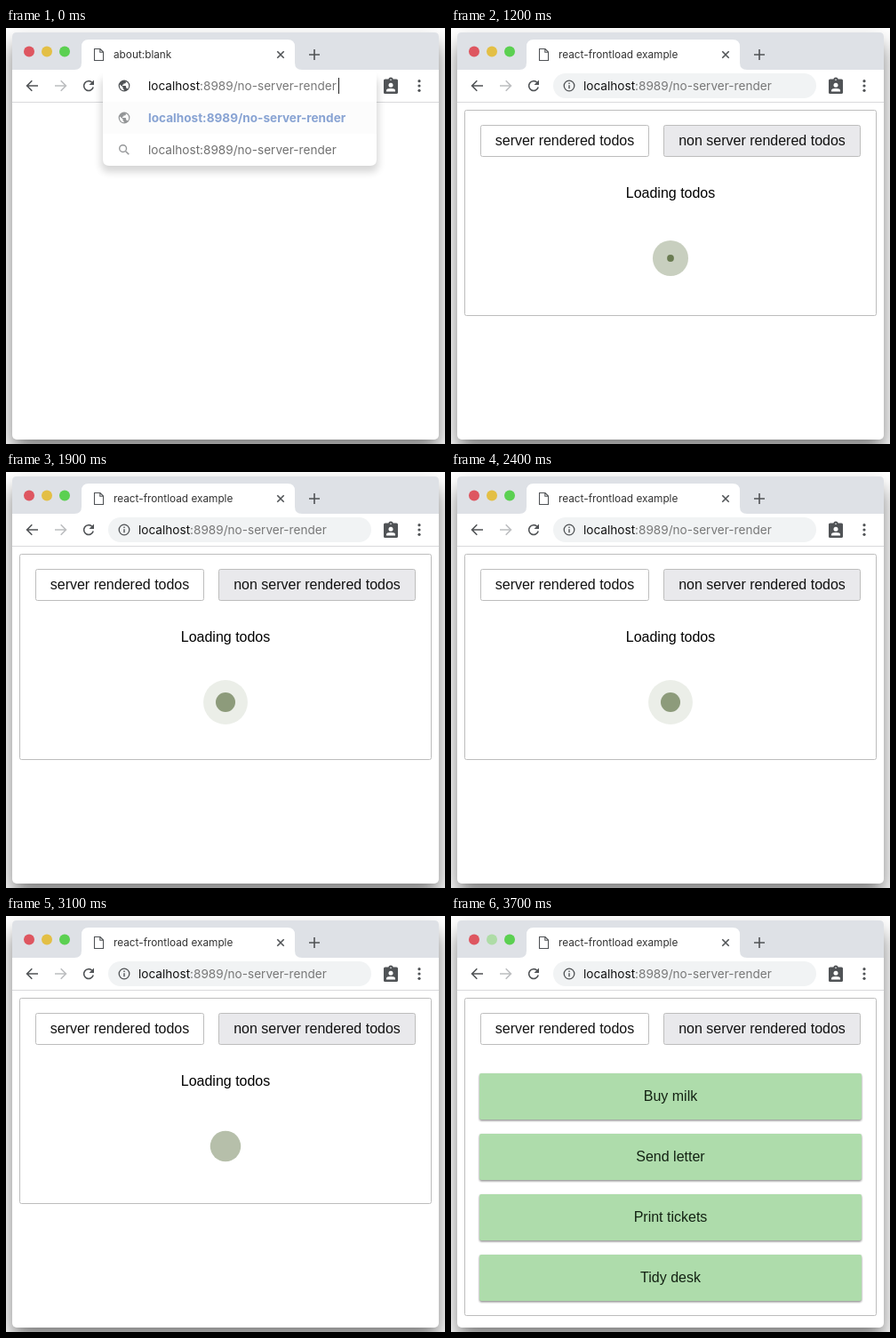
Write an HTML page that moves like this. It is 494 px wide and 468 px high and loops after 5 s.

```html
<!DOCTYPE html>
<html lang="en">
<head>
<meta charset="utf-8">
<title>Loading todos</title>
<style>
html, body { margin: 0; width: 100%; height: 100%; overflow: hidden; background: #fff; }
svg { display: block; width: 494px; height: 468px; }
.ui { font: 13.6px Inter, Roboto, sans-serif; fill: #111; }
.tab { font-size: 11.8px; fill: #333; }
.path { fill: #777; }
.match { font-weight: 700; fill: #3c69b8; }
.page { font: 16px "Liberation Sans", Arial, sans-serif; fill: #111; text-anchor: middle; }
.line { fill: none; stroke: #505356; stroke-width: 1.6; }
</style>
</head>
<body>
<svg viewBox="0 0 494 468">
  <defs>
    <filter id="winShadow" x="-20%" y="-20%" width="140%" height="140%"><feGaussianBlur stdDeviation="11"/></filter>
    <filter id="dropShadow" x="-10%" y="-20%" width="120%" height="150%"><feGaussianBlur stdDeviation="4"/></filter>
    <filter id="cardShadow" x="-5%" y="-20%" width="110%" height="150%"><feGaussianBlur stdDeviation="1.2"/></filter>
    <clipPath id="below"><rect x="90" y="47" width="346" height="130"/></clipPath>
    <g id="globe">
      <circle r="6.4" fill="#505356"/>
      <path d="M-5 -1.6 L-1.5 1.6 V3 L-.3 4.2 V5.2 C-3.6 5 -5.6 2 -5 -1.6Z" fill="#fff"/>
      <path d="M1.3 -5 C4.2 -4 5.4 -1.8 5.1 1 C4.9 2.2 4.4 3 3.7 3.6 C3.4 2.6 2.9 2.4 2.1 2.4 V.6 L1.4 0 H-2 V-1.3 H-.7 V-2.6 H.7 C1.4 -2.6 2 -3.2 2 -4Z" fill="#fff"/>
    </g>
  </defs>

  <rect width="494" height="468" fill="#fff"/>
  <rect x="7" y="18" width="480" height="458" rx="8" opacity=".5" filter="url(#winShadow)"/>
  <rect x="7" y="5" width="480" height="458" rx="5" fill="#fff"/>
  <path d="M7 47 V10 Q7 5 12 5 H482 Q487 5 487 10 V47Z" fill="#dee1e6"/>
  <path d="M77 47 Q85 47 85 39 V21 Q85 13 93 13 H317 Q325 13 325 21 V39 Q325 47 333 47Z" fill="#fff"/>
  <circle cx="26" cy="26.5" r="6" fill="#de5660"/>
  <circle id="middle" cx="46" cy="26.5" r="6"/>
  <circle cx="66" cy="26.5" r="6" fill="#5bd051"/>

  <path class="line" style="stroke-width:1.1" d="M99.5 23.5 H106 L109.5 27 V36.5 H99.5Z M105.8 23.5 V27.2 H109.5"/>
  <text id="title" class="ui tab" x="121" y="34"></text>
  <path class="line" d="M305.3 26.3 L312.7 33.7 M312.7 26.3 L305.3 33.7"/>
  <path class="line" d="M341 30 H353 M347 24 V36"/>

  <path class="line" d="M36 65 H24 M29.3 59.3 L23.6 65 L29.3 70.7"/>
  <path class="line" style="stroke:#bcbec0" d="M55 65 H67 M61.7 59.3 L67.4 65 L61.7 70.7"/>
  <path class="line" d="M96.8 61.2 A5.4 5.4 0 1 0 98.2 66.6"/>
  <path d="M99 58.5 V64 H93.5Z" fill="#505356"/>
  <g fill="#505356">
    <rect x="425" y="57.5" width="16" height="16.5" rx="1.6"/>
    <circle cx="433" cy="58" r="2.6"/>
    <circle cx="465" cy="59.7" r="1.6"/><circle cx="465" cy="65" r="1.6"/><circle cx="465" cy="70.3" r="1.6"/>
  </g>
  <g fill="#fff">
    <circle cx="433" cy="58.2" r=".8"/><circle cx="433" cy="64.3" r="2.5"/>
    <path d="M428 71.5 V70 Q428 67.9 433 67.9 Q438 67.9 438 70 V71.5Z"/>
  </g>
  <path d="M7 83.5 H487" stroke="#d9dadc"/>

  <g id="bar">
    <rect x="115" y="51" width="296" height="28" rx="14" fill="#f1f3f4"/>
    <circle class="line" style="stroke-width:1.3" cx="133" cy="65" r="5.8"/>
    <path class="line" style="stroke-width:1.4" d="M133 64.2 V68.2 M133 61.6 V63"/>
    <text class="ui" x="149" y="70">localhost<tspan class="path">:8989/no-server-render</tspan></text>
  </g>

  <g id="drop">
    <g clip-path="url(#below)">
      <rect id="glow" x="107" y="56" width="312" height="106" rx="8" filter="url(#dropShadow)"/>
    </g>
    <path d="M109 47 H417 V148 Q417 155 410 155 H116 Q109 155 109 148Z" fill="#fff"/>
    <rect id="hover" x="109" y="83" width="308" height="36" fill="#f1f1f1"/>
    <use href="#globe" x="133" y="65"/>
    <text class="ui" x="160" y="70">localhost<tspan class="path">:8989/no-server-render</tspan></text>
    <path id="caret" d="M374.5 56 V74" stroke="#222"/>
    <g id="rows">
      <use href="#globe" x="133" y="101"/>
      <text class="ui match" x="160" y="106">localhost:8989/no-server-render</text>
      <path class="line" d="M134.7 138.7 L138.3 142.3"/>
      <circle class="line" style="stroke-width:1.4" cx="131.6" cy="135.6" r="3.9"/>
      <text class="ui" x="160" y="142">localhost:8989/no-server-render</text>
    </g>
  </g>

  <g id="page" class="page">
    <rect id="panel" x="15.5" y="92.5" width="463" rx="2" fill="none" stroke="#bdbdbd"/>
    <rect x="33.5" y="109.5" width="189" height="35" rx="2" fill="#fff" stroke="#bdbdbd"/>
    <rect x="239.5" y="109.5" width="221" height="35" rx="2" fill="#e9e9ec" stroke="#bdbdbd"/>
    <text x="128" y="132">server rendered todos</text>
    <text x="350" y="132">non server rendered todos</text>
    <g id="loading">
      <text x="247" y="191" fill="#000">Loading todos</text>
      <g fill="#5e7244"><circle class="pulse" cx="247" cy="259"/><circle class="pulse" cx="247" cy="259"/></g>
    </g>
    <g id="list"></g>
  </g>
</svg>
<script>
const LOOP = 5000, STEP = 100;
const NAVIGATE = 1000, MOUNT = 1100, LOADED = 3200;
const $ = id => document.getElementById(id);
const show = (id, on) => $(id).setAttribute('display', on ? 'inline' : 'none');
const pulses = document.querySelectorAll('.pulse');

$('list').innerHTML = ['Buy milk', 'Send letter', 'Print tickets', 'Tidy desk'].map((todo, i) => {
  const y = 177 + 68 * i;
  return `<rect x="32" y="${y + 1.2}" width="430" height="52" rx="2" opacity=".5" filter="url(#cardShadow)"/>
    <rect x="32" y="${y}" width="430" height="52" rx="2" fill="#aedcab"/>
    <text x="247" y="${y + 31}" fill="#132213">${todo}</text>`;
}).join('');

// Each ring grows and fades over one second; the two run half a second apart.
function drawPulse(circle, age) {
  circle.setAttribute('r', Math.min(25, 40 * age - 11 * age * age));
  circle.setAttribute('opacity', Math.max(0, 1 - 1.1 * age));
}

function draw(t) {
  const mounted = t >= MOUNT, loaded = t >= LOADED;
  const fade = Math.min(1, t / 200);

  show('drop', t < NAVIGATE);
  show('bar', t >= NAVIGATE);
  show('caret', t < 500);
  $('hover').setAttribute('opacity', 0.25 + 0.75 * fade);
  $('rows').setAttribute('opacity', 0.6 + 0.4 * fade);
  $('glow').setAttribute('opacity', 0.16 + 0.16 * fade);

  $('title').textContent = mounted ? 'react-frontload example' : 'about:blank';
  $('middle').setAttribute('fill', loaded ? '#aedca6' : '#e3bf45');
  show('page', mounted);
  show('loading', !loaded);
  show('list', loaded);
  $('panel').setAttribute('height', loaded ? 357 : 231);

  if (mounted && !loaded) {
    const age = (t - MOUNT) / 1000;
    const young = age % 0.5;
    drawPulse(pulses[0], young + 0.5);
    drawPulse(pulses[1], young);
  }
}

const start = performance.now();
function tick() {
  const t = (performance.now() - start) % LOOP;
  draw(Math.floor(t / STEP) * STEP);
  requestAnimationFrame(tick);
}
tick();
</script>
</body>
</html>
```
